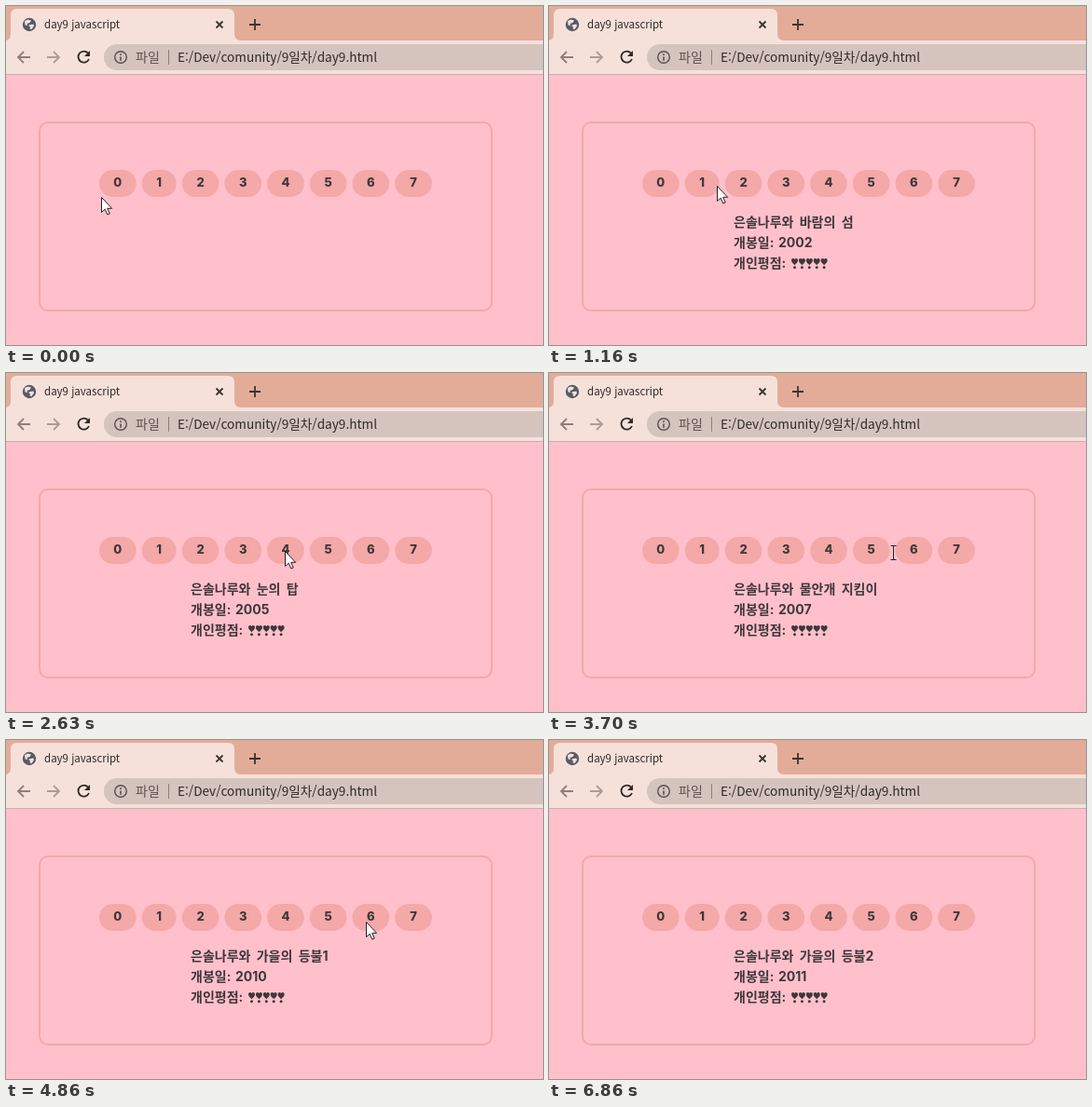
An HTML page that plays this animation: 576x364 px, repeating every 7.33 s.

```html
<!DOCTYPE html>
<html lang="ko">
<head>
<meta charset="utf-8">
<title>day9 javascript</title>
<style>
  html, body { margin: 0; width: 100%; height: 100%; overflow: hidden; background: #ffc0cb; }
  svg { display: block; width: 100vw; height: 100vh; }
  .ui { font-family: 'Noto Sans CJK KR', 'Noto Sans CJK', sans-serif; font-weight: 300; fill: #2f2927; }
  .page { font: 700 14px Inter, 'Noto Sans CJK KR', 'Noto Sans CJK', sans-serif; fill: #3d383a; word-spacing: 3px; }
  .num { font: 800 13px Inter, sans-serif; fill: #3d383a; text-anchor: middle; }
  .line { fill: none; stroke-width: 1.8; }
</style>
</head>
<body>
<svg viewBox="0 0 576 364">
  <defs>
    <path id="heart" d="M3.5 7.2C1.5 5.4 0 4.2 0 2.1C0 .7.8 0 1.8 0C2.6 0 3.2.5 3.5 1.2C3.8.5 4.4 0 5.2 0C6.2 0 7 .7 7 2.1C7 4.2 5.5 5.4 3.5 7.2ZM3.5 8.2a1.5 1.5 0 1 1-.01 0Z"/>
  </defs>

  <rect width="576" height="40" fill="#e3ac99"/>
  <rect y="37" width="576" height="37" fill="#f6e1da"/>
  <path d="M-1 37Q5 37 5 30V10Q5 3 12 3H238Q245 3 245 10V30Q245 37 252 37Z" fill="#f6e1da"/>
  <path d="M0 73.5H576" stroke="#c6b2ad"/>

  <circle cx="25" cy="20" r="7.2" fill="#555c63"/>
  <path d="M20 16L23.5 14.5L27 15.5L25.5 18L22.5 19L23 21L20.5 20.5ZM26 20L29.5 19.5L30 21.5L27.5 25L25.5 24.5L26 22.5L24 21Z" fill="#f6e1da"/>
  <text class="ui" x="41" y="24" font-size="11.5">day9 javascript</text>
  <path class="line" d="M225.5 16.5l7 7m0-7l-7 7M261 20h12m-6-6v12" stroke="#3b3331"/>

  <path class="line" d="M26 55H13m6-6l-6 6l6 6" stroke="#8d7f7b"/>
  <path class="line" d="M44 55h13m-6-6l6 6l-6 6" stroke="#ab9c97"/>
  <path class="line" d="M88 50.6A6 6 0 1 0 89 57" stroke="#2f2927"/>
  <path d="M90 48v6h-6Z" fill="#2f2927"/>
  <rect x="105" y="41" width="500" height="28" rx="14" fill="#d5c3bd"/>
  <circle class="line" cx="123" cy="55" r="6.3" stroke="#594f4c" style="stroke-width:1.4"/>
  <path d="M123 51.3v1.7m0 1.4v4.3" stroke="#594f4c" stroke-width="1.6"/>
  <text class="ui" x="139" y="60" font-size="14" style="fill:#5d524f">파일</text>
  <path d="M174.5 47v16" stroke="#8d7f7a"/>
  <text class="ui" x="184" y="60" font-size="13.6">E:/Dev/comunity/9일차/day9.html</text>

  <rect x="36" y="125" width="485" height="202" rx="9" fill="none" stroke="#f3a8a8" stroke-width="2"/>
  <g id="buttons"></g>
  <g id="info" class="page">
    <text id="name" x="198" y="237"></text>
    <text x="198" y="259">개봉일:</text>
    <text id="year" x="246" y="259"></text>
    <text x="198" y="281">개인평점:</text>
    <g id="hearts"></g>
  </g>
  <g id="cursor">
    <path id="arrow" d="M.5 .5V16.5L4.2 13.2L6.8 19L9.2 18L6.7 12.3H11.6Z" fill="#fff" stroke="#222"/>
    <path id="beam" d="M-2.5 -7.5H3.5M.5 -7.5V7.5M-2.5 7.5H3.5" fill="none" stroke="#222"/>
  </g>
</svg>
<script>
const LOOP = 7330, TICK = 70, LEAVE = 6860;
const $ = id => document.getElementById(id);
const range = n => [...Array(n).keys()];

const films = [
  { click: 300, name: '두루미의 꿈', year: 2001 },
  { click: 950, name: '바람의 섬', year: 2002 },
  { click: 1640, name: '달그림자의 노래', year: 2004 },
  { click: 2240, name: '눈의 탑', year: 2005 },
  { click: 3230, name: '물안개 지킴이', year: 2007 },
  { click: 4110, name: '새벽정원', year: 2009, rating: 4 },
  { click: 4730, name: '가을의 등불1', year: 2010 },
  { click: 5530, name: '가을의 등불2', year: 2011 }
];

// the pointer rests, then glides on: start, duration, x, y
const home = [102, 205];
const glides = [
  [70, 540, 155, 190],
  [950, 420, 193, 195],
  [1640, 140, 207, 191],
  [1780, 190, 243, 179],
  [2240, 390, 299, 191],
  [3230, 490, 369, 193],
  [3720, 180, 347, 191],
  [3970, 70, 334, 180],
  [4110, 220, 386, 195],
  [4870, 270, 440, 188],
  [5530, 340, 435, 199],
  [6730, 140, 511, 250]
];

// equal buttons in a row; the narrow digit 1 makes its button narrower
let left = 100;
const buttons = films.map((_, i) => {
  const b = { x: left, w: i === 1 ? 37 : 39.7 };
  left += b.w + 6;
  return b;
});

$('buttons').innerHTML = buttons.map(({ x, w }, i) =>
  `<rect x="${x}" y="176" width="${w}" height="29" rx="14.5" fill="#f4a8a8"/>
   <text class="num" x="${x + w / 2}" y="194">${i}</text>`).join('');
$('hearts').innerHTML = range(5).map(i =>
  `<use href="#heart" x="${260 + i * 7.9}" y="271"/>`).join('');
const hearts = [...$('hearts').children];

function pointerAt(t) {
  let [x, y] = home;
  for (const [start, duration, toX, toY] of glides) {
    if (t < start) break;
    const ticks = Math.floor((t - start) / TICK) + 1;
    const u = Math.min(1, ticks * TICK / duration);
    x += (toX - x) * u;
    y += (toY - y) * u;
  }
  return [Math.round(x), Math.round(y)];
}

function overGap(x, y) {
  const first = buttons[0], last = buttons[buttons.length - 1];
  return y > 176 && y < 205 && x > first.x && x < last.x &&
    !buttons.some(b => x >= b.x && x <= b.x + b.w);
}

function show(el, on) {
  el.setAttribute('visibility', on ? 'visible' : 'hidden');
}

function render(t) {
  const film = films.filter(f => f.click <= t).pop();
  $('info').style.display = film ? '' : 'none';
  if (film) {
    $('name').textContent = '은솔나루와 ' + film.name;
    $('year').textContent = film.year;
    hearts.forEach((h, i) => show(h, i < (film.rating ?? 5)));
  }
  const [x, y] = pointerAt(t);
  const beam = overGap(x, y);
  $('cursor').setAttribute('transform', `translate(${x} ${y})`);
  show($('arrow'), t < LEAVE && !beam);
  show($('beam'), t < LEAVE && beam);
}

const start = performance.now();
function tick() {
  render((performance.now() - start) % LOOP);
  requestAnimationFrame(tick);
}
tick();
</script>
</body>
</html>
```
